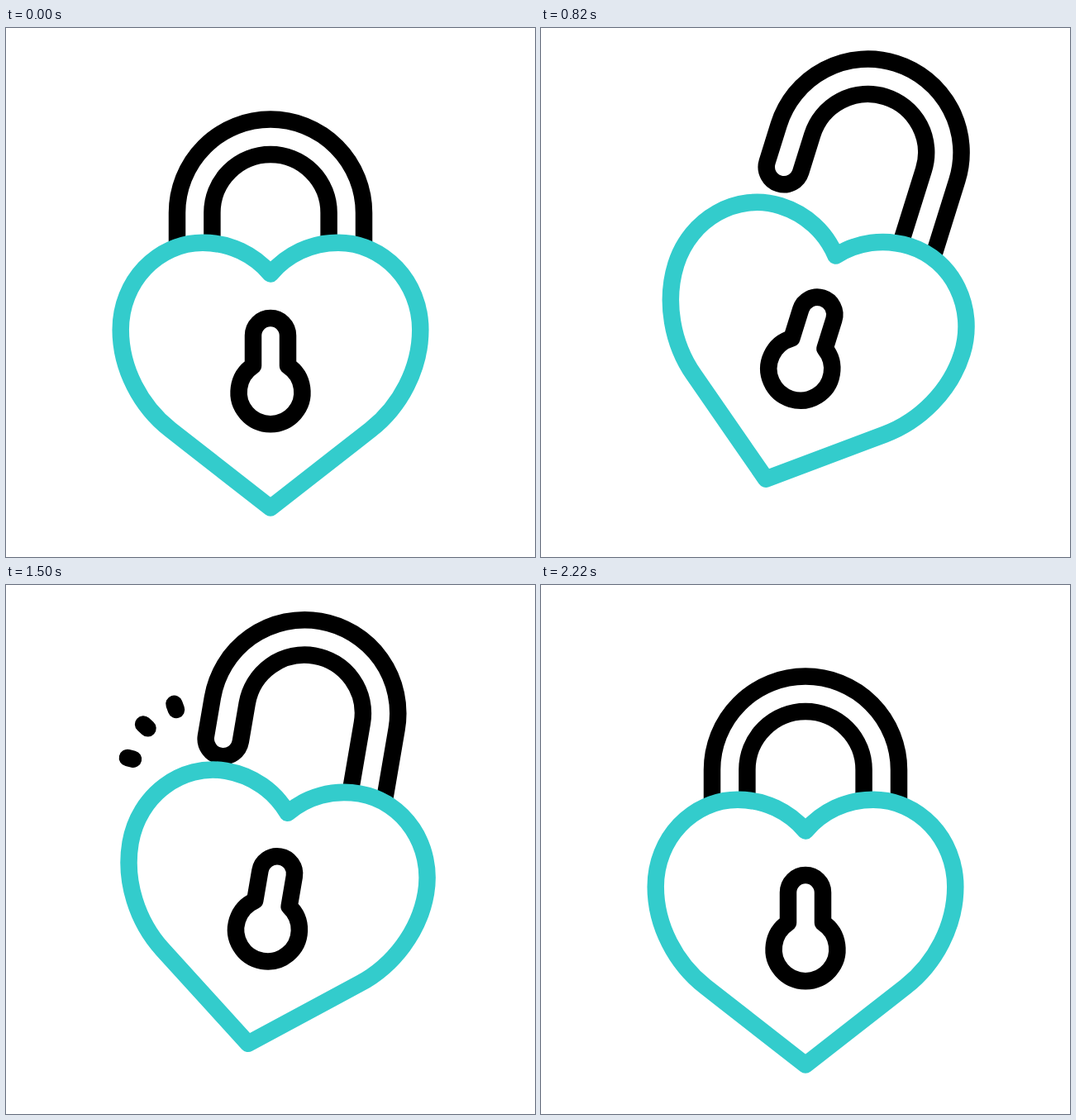
An HTML page for the animation above (2.4 s loop, 640 by 640 pixels).

```html
<!DOCTYPE html>
<html lang="en">
<head>
<meta charset="utf-8">
<title>Heart padlock</title>
<style>
  html, body { margin: 0; width: 100%; height: 100%; overflow: hidden; background: #fff; }
  svg { display: block; width: 100vw; height: 100vh; }
  path { fill: none; stroke: #000; stroke-width: 20.5; stroke-linecap: round; stroke-linejoin: round; }
  #heart { fill: #fff; stroke: #33cccc; }
</style>
</head>
<body>
<svg viewBox="0 0 640 640">
  <!-- Origin of the lock is the centre of the heart -->
  <g id="lock">
    <path id="shackle" d="M113 -46 V-196.4 A113 113 0 0 0 -113 -196.4 V-149.4
      a21.2 21.2 0 0 0 42.4 0 V-196.4 A70.6 70.6 0 0 1 70.6 -196.4 V-46"/>
    <path id="heart" d="M0 -122.5 C-20 -146 -49 -160.2 -82 -160.2 C-136.8 -160.2 -181.3 -113 -181.3 -55
      C-181.3 -8 -157 38 -121 66 L0 160.5 L121 66
      C157 38 181.3 -8 181.3 -55 C181.3 -113 136.8 -160.2 82 -160.2 C49 -160.2 20 -146 0 -122.5 Z"/>
    <path d="M-21 -11.4 V-48 a21 21 0 0 1 42 0 V-11.4 A38.4 38.4 0 1 1 -21 -11.4 Z"/>
    <path id="sparks"/>
  </g>
</svg>
<script>
const LOOP = 2400;
const $ = id => document.getElementById(id);
const lock = $('lock'), shackle = $('shackle'), sparks = $('sparks');

// Each track is a list of [time, value] keys, eased smoothly in between.
const tracks = {
  angle: [[200, 0], [900, 18], [1400, 18], [1700, -14], [2000, 4.5], [2220, 0]],
  open: [[200, 0], [1000, 1], [1400, 1], [1700, 0]],
  head: [[1400, 0], [1700, 1]],
  tail: [[1700, 0], [2000, 1]]
};

// Inner and outer end of each spark: x1, y1, x2, y2
const rays = [
  [-153.8, -223, -168.2, -248],
  [-184, -195, -207.8, -210],
  [-195, -155.3, -222.8, -157]
];

function valueAt(keys, t) {
  const i = keys.findIndex(k => k[0] > t);
  if (i < 0) return keys[keys.length - 1][1];
  if (i === 0) return keys[0][1];
  const [t0, a] = keys[i - 1], [t1, b] = keys[i];
  const x = (t - t0) / (t1 - t0);
  return a + (b - a) * x * x * (3 - 2 * x);
}

function sparkPath(tail, head) {
  if (head <= tail) return '';
  return rays.map(([x1, y1, x2, y2]) => {
    const point = p => `${x1 + (x2 - x1) * p} ${y1 + (y2 - y1) * p}`;
    return `M${point(tail)}L${point(head)}`;
  }).join('');
}

function draw(now) {
  const t = now % LOOP;
  const at = name => valueAt(tracks[name], t);
  const open = at('open');
  lock.setAttribute('transform', `translate(320 ${420 - 31.6 * open}) rotate(${at('angle')})`);
  shackle.setAttribute('transform', `translate(0 ${-65.5 * open})`);
  sparks.setAttribute('d', sparkPath(at('tail'), at('head')));
}

let start;
function frame(now) {
  start ??= now;
  draw(now - start);
  requestAnimationFrame(frame);
}
draw(0);
requestAnimationFrame(frame);
</script>
</body>
</html>
```
